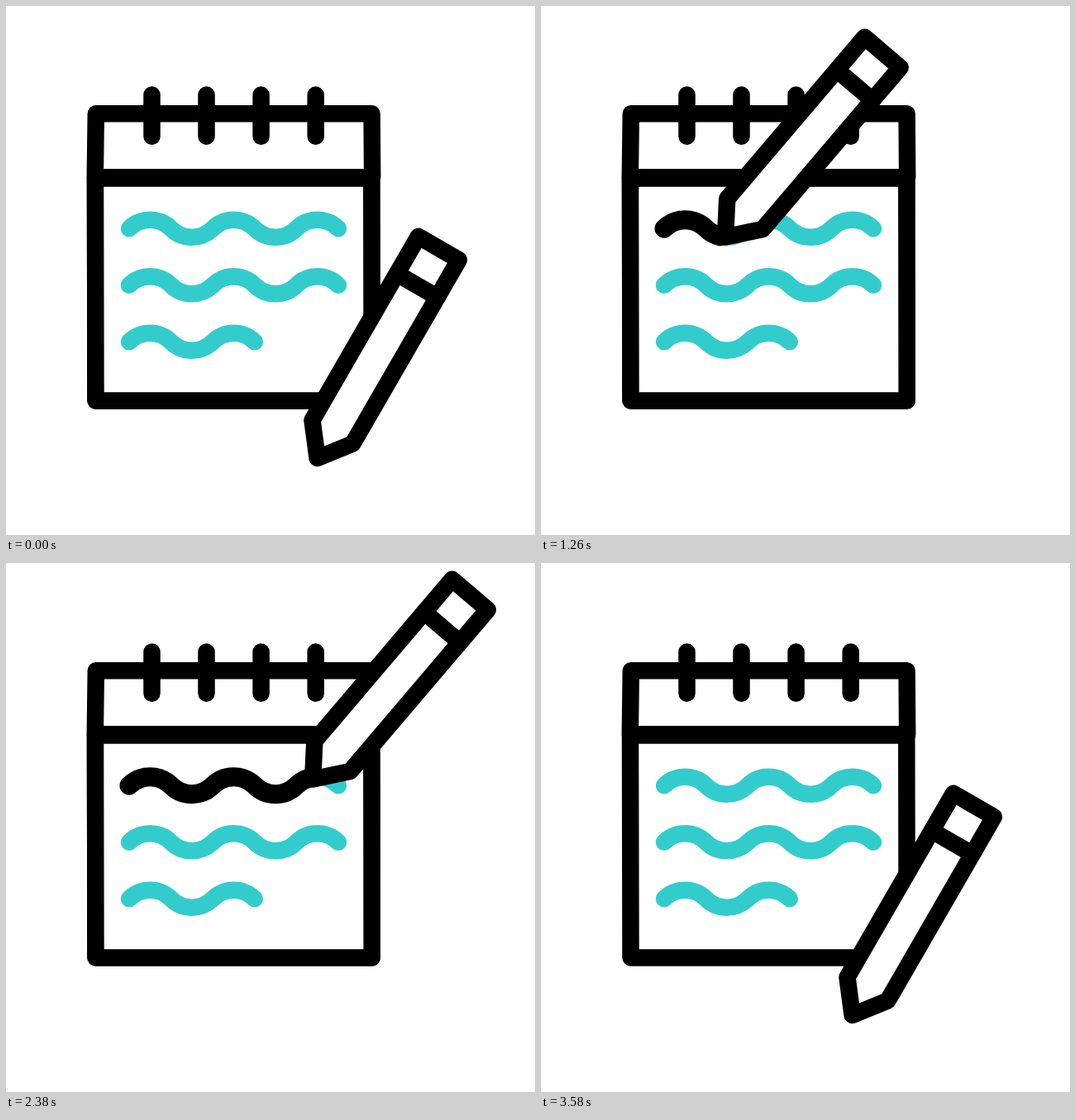
These frames come from a looping animation (640 px wide and 640 px high, 3620 ms). An HTML page:

```html
<!DOCTYPE html>
<html lang="en">
<head>
<meta charset="utf-8">
<title>Notepad and pencil</title>
<style>
  html, body { margin: 0; width: 100%; height: 100%; overflow: hidden; background: #fff; }
  svg { display: block; width: 100vw; height: 100vh; }
  .ink { stroke: #000; stroke-width: 20.5; stroke-linecap: round; stroke-linejoin: round; fill: #fff; }
  .wave { stroke: #3cc; stroke-width: 20.5; stroke-linecap: round; fill: none; }
  .written { stroke: #000; stroke-width: 23; }
</style>
</head>
<body>
<svg viewBox="0 0 640 640">
  <defs>
    <g id="sheet">
      <path class="ink" d="M108 208.4H442.3L442.7 477.6H108.5Z"/>
      <path class="wave" id="row1"/>
      <path class="wave" id="row2"/>
      <path class="wave" id="row3"/>
    </g>
    <path id="approach" d="M450 420C340 370 237 255 242.5 162.3"/>
    <path id="leave" d="M504.5 158.3C496 90 483 330 450 420"/>
  </defs>
  <use href="#sheet"/>
  <g id="page">
    <use href="#sheet"/>
    <path class="wave written" id="line"/>
  </g>
  <path class="ink" d="M108.8 130.2H442.6L443.2 207.2H107.8Z"/>
  <path class="ink" d="M176.5 107.6V157.8M242.5 107.6V157.8M308.6 107.6V157.8M374.7 107.6V157.8"/>
  <g id="pencil" class="ink">
    <path d="M-28.3 -146.7H28.3V110L0 146.7L-28.3 110Z"/>
    <path d="M-28.3 -94.7H28.3"/>
  </g>
</svg>
<script>
const LOOP = 3620;
const REST = 30, WRITE = 40.4;      // pencil tilt in degrees
const TIP = { x: 95, y: -111.7 };   // from the tip to the centre while writing
const $ = id => document.getElementById(id);
const [page, line, pencil, approach, leave] =
  ['page', 'line', 'pencil', 'approach', 'leave'].map($);

const wave = (y, humps) => {
  let d = `M149 ${y}`;
  for (let i = 0; i < humps; i++) {
    const h = i % 2 ? 14 : -14;
    d += `c14 ${h} 36.6 ${h} 50.6 0`;
  }
  return d;
};
$('row1').setAttribute('d', wave(269.2, 5));
$('row2').setAttribute('d', wave(337.7, 5));
$('row3').setAttribute('d', wave(406.2, 3));
line.setAttribute('d', wave(269.2, 5));
const lineLength = line.getTotalLength();

const span = (t, a, b) => Math.min(1, Math.max(0, (t - a) / (b - a)));
const smooth = p => p * p * (3 - 2 * p);
const mix = (a, b, p) => a + (b - a) * p;
const along = (path, p) => path.getPointAtLength(path.getTotalLength() * p);

function pose(t) {
  if (t < 745) {
    const p = smooth(span(t, 0, 570));
    const { x, y } = along(approach, p);
    return { x, y, tilt: mix(REST, WRITE, p) };
  }
  if (t < 3200) {
    const head = along(line, span(t, 745, 2655));
    const lead = span(t, 745, 925);
    return {
      x: head.x + mix(-1.5, 6.5, lead) + TIP.x,
      y: head.y + mix(4.8, 0.8, lead) + TIP.y,
      tilt: WRITE
    };
  }
  const p = smooth(span(t, 3200, 3567));
  const { x, y } = along(leave, p);
  return { x, y, tilt: mix(WRITE, REST, p) };
}

function render(t) {
  const drawn = span(t, 745, 2655);
  line.style.display = drawn > 0 ? '' : 'none';
  line.setAttribute('stroke-dasharray', `${lineLength * drawn + 0.01} ${drawn < 1 ? lineLength * 2 : 0}`);

  const fall = span(t, 2830, 3360);
  page.style.display = fall < 1 ? '' : 'none';
  page.setAttribute('transform', `translate(0 ${450 * fall ** 2.1})`);

  const { x, y, tilt } = pose(t);
  pencil.setAttribute('transform', `translate(${x} ${y}) rotate(${tilt})`);
}

const start = performance.now();
function tick() {
  render((performance.now() - start) % LOOP);
  requestAnimationFrame(tick);
}
tick();
</script>
</body>
</html>
```
